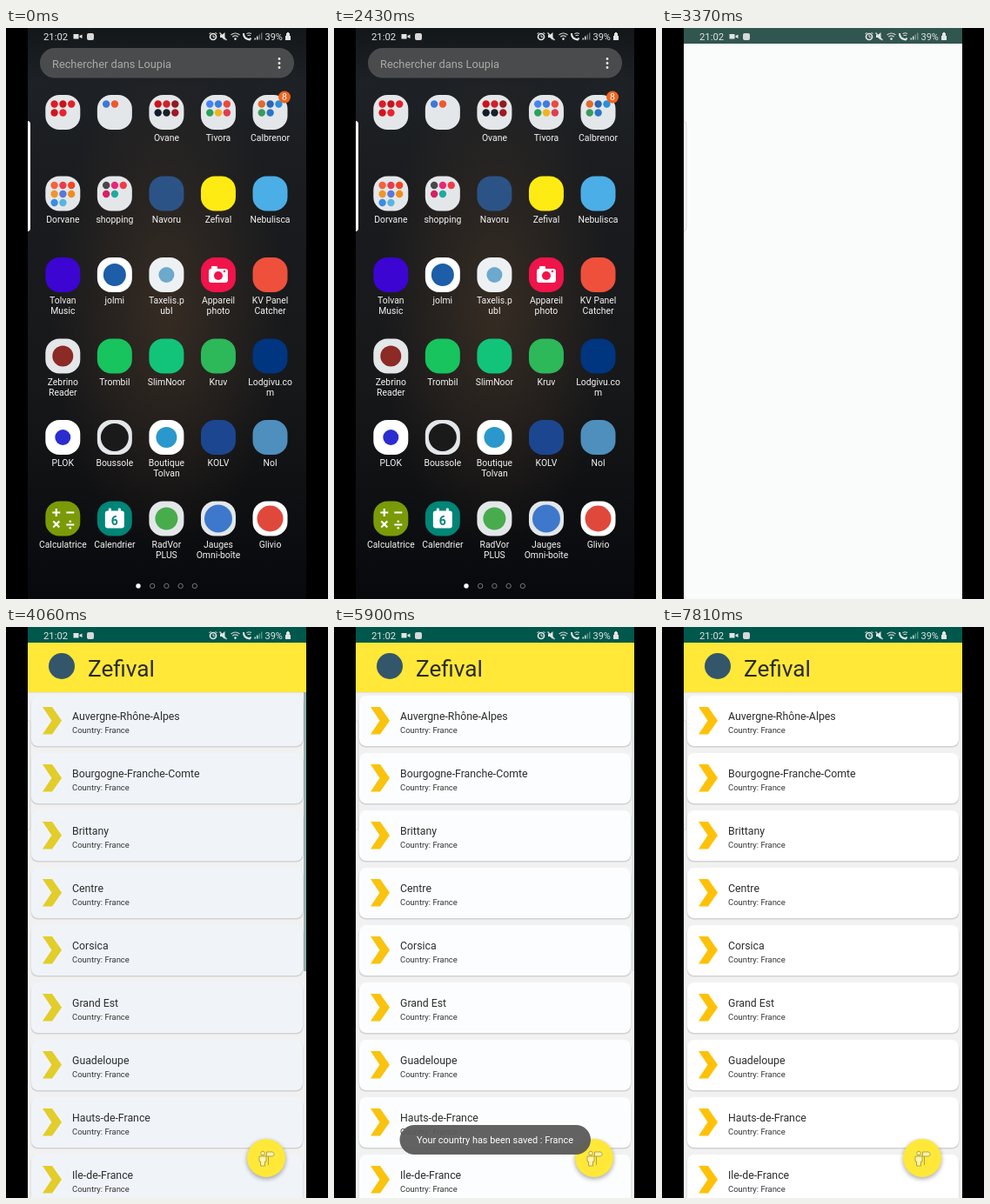
An HTML page for the animation above (8 s loop, 370 by 657 pixels).

```html
<!DOCTYPE html>
<html lang="fr">
<head>
<meta charset="utf-8">
<style>
  html, body { margin: 0; width: 100%; height: 100%; overflow: hidden; background: #000; }
  svg { display: block; width: 370px; height: 657px; font-family: Roboto, sans-serif; }
</style>
</head>
<body>
<svg id="stage" viewBox="0 0 370 657"></svg>
<script>
const stage = document.getElementById('stage');

const rect = (x, y, w, h, fill, r = 0, more = '') =>
  `<rect x="${x}" y="${y}" width="${w}" height="${h}" rx="${r}" fill="${fill}" ${more}/>`;
const circle = (x, y, r, fill, more = '') =>
  `<circle cx="${x}" cy="${y}" r="${r}" fill="${fill}" ${more}/>`;
const path = (d, fill, more = '') => `<path d="${d}" fill="${fill}" ${more}/>`;
const text = (x, y, size, fill, s, more = '') =>
  `<text x="${x}" y="${y}" font-size="${size}" fill="${fill}" ${more}>${s}</text>`;
const mid = 'text-anchor="middle"';
const line = (color, w) => `stroke="${color}" stroke-width="${w}"`;

// Small pictures, drawn around the icon centre
const camera = rect(-11, -7, 22, 16, '#fff', 3) + rect(-8, -10, 7, 4, '#fff', 1) +
  circle(0, 1, 5, '#f0144b') + circle(7, -4, 1.2, '#f0144b');
const calculator = path('M-12-7h9M-7.500-11.500v9M4-7h9M-11 3l7 7m0-7l-7 7M4 7h9', 'none', line('#fff', 2.2)) +
  circle(8.5, 3.3, 1.3, '#fff') + circle(8.5, 10.700, 1.3, '#fff');
const calendar = rect(-11, -9, 22, 20, '#fff', 3) + rect(-7, -12, 3, 6, '#fff', 1) + rect(4, -12, 3, 6, '#fff', 1) +
  text(0, 7, 14, '#008577', '6', mid + ' font-weight="700"');
const dot = (color, r = 13) => circle(0, 0, r, color);
const folder = colors => colors.split(' ').map((c, i) =>
  c === '-' ? '' : circle(-9.7 + i % 3 * 9.8, -9.5 + Math.floor(i / 3) * 10, 4.2, c)).join('');

const plate = '#e4e7e9';
// label, background, picture
const apps = [
  ['', plate, folder('#d81e28 #c4161c #e0202c #d2141e #e6242e')],
  ['', plate, folder('#3c78d8 #f0582c')],
  ['Ovane', plate, folder('#c8141e #d0202a #8c1c22 #101c2c #182028 #a01824')],
  ['Tivora', plate, folder('#4285f4 #3c7de0 #e84a3c #2aa25a #f0b41e #e03c50')],
  ['Calbrenor', plate, folder('#e06a2c #2c64b4 #2890dc #3c9a5a #2c74c8')],
  ['Dorvane', plate, folder('#f0643c #e83c50 #f04628 #f09628 #5a78d8 #f08c1e #3c8ce0 #5ab4e0')],
  ['shopping', plate, folder('#484848 #e6287c #f03c48 #d81e64 #1eaaa0')],
  ['Navoru', '#2c5385', ''],
  ['Zefival', '#ffeb14', ''],
  ['Nebulisca', '#4caee6', ''],
  ['Tolvan|Music', '#3c05d2', ''],
  ['jolmi', '#fff', dot('#1d5ea8')],
  ['Taxelis.p|ubl', '#eef1f3', dot('#6ca9cc', 9)],
  ['Appareil|photo', '#f0144b', camera],
  ['KV Panel|Catcher', '#ee503c', ''],
  ['Zebrino|Reader', plate, dot('#8c2a26', 12)],
  ['Trombil', '#18c45e', ''],
  ['SlimNoor', '#12c47a', ''],
  ['Kruv', '#2db85a', ''],
  ['Lodgivu.co|m', '#003580', ''],
  ['PLOK', '#fff', dot('#2a2cd0', 9)],
  ['Boussole', plate, dot('#1b1a1a', 16)],
  ['Boutique|Tolvan', '#fff', dot('#2a98cc', 12)],
  ['KOLV', '#1c4690', ''],
  ['Nol', '#4f8fbd', ''],
  ['Calculatrice', '#7a9a08', calculator],
  ['Calendrier', '#008577', calendar],
  ['RadVor|PLUS', plate, dot('#48ac4c')],
  ['Jauges|Omni-boîte', plate, dot('#3d78cc', 16)],
  ['Glivio', '#fff', dot('#e0483c', 15)],
];

const icon = ([label, color, picture], i) => {
  const x = 65.3 + i % 5 * 59.55, y = 97 + Math.floor(i / 5) * 93.5;
  return `<g transform="translate(${x} ${y})">` + rect(-20, -20, 40, 40, color, 16) + picture +
    label.split('|').map((s, n) => text(0, 33 + n * 12, 10.4, '#f4f4f4', s, mid)).join('') + '</g>';
};

const drawer =
  rect(25, 0, 320, 657, 'url(#night)') + rect(25, 0, 320, 657, 'url(#glow)') +
  rect(39, 23, 292, 34.5, '#4a4b4c', 17) +
  text(53, 45.5, 12.8, '#a9a9a9', 'Rechercher dans Loupia') +
  [35.5, 40.5, 45.5].map(y => circle(314, y, 1.4, '#e8e8e8')).join('') +
  apps.map(icon).join('') +
  circle(320, 79.500, 7, '#f0641e') + text(320, 83.300, 10.5, '#fff', '8', mid) +
  [0, 1, 2, 3, 4].map(i => circle(152 + i * 16.2, 642, 2.700, i ? 'none' : '#fff', i ? line('#777', 1) : '')).join('') +
  path('M25 107q3 0 3 4v119q0 4-3 4z', '#fff');

const regions = ['Auvergne-Rhône-Alpes', 'Bourgogne-Franche-Comte', 'Brittany', 'Centre', 'Corsica',
  'Grand Est', 'Guadeloupe', 'Hauts-de-France', 'Ile-de-France'];
const card = (name, i) => `<g transform="translate(0 ${i * 66})">` +
  rect(28.5, 80, 313, 58.500, '#d2d2d2', 8) + rect(29, 79, 312, 58, 'var(--card)', 8) +
  path('M42 92h11l11 15.700-11 15.800h-11l10.500-15.800z', 'var(--arrow)') +
  text(76, 107.300, 12.3, '#2c2c2c', name) + text(76, 122.300, 9.45, '#333', 'Country: France') + '</g>';

const fab = circle(299, 613, 22.500, '#000', 'opacity=".3" filter="url(#soft)"') + circle(299, 611, 22, '#ffe838') +
  `<g fill="#fff3a8" stroke="#a39a52" stroke-width=".9">` +
  `<circle cx="295" cy="605.500" r="2.300"/><path d="M291 609h8v6h-1.500v5h-5v-5H291z"/>` +
  `<path d="M299.500 604h7l2 2.500-2 2.500h-7zM301.500 609v10"/></g>`;

const list =
  rect(25, 18, 320, 639, '#f1f1f1') + rect(25, 18, 320, 57, '#ffe838') + rect(25, 75, 320, 1, '#e4e2d2') +
  circle(64, 45, 15, '#34566b') + text(94, 56.500, 26.2, '#2b2b26', 'Zefival') +
  regions.map(card).join('') +
  rect(342, 75, 3, 321, '#93aeac', 0, 'id="bar"') + fab;

const toast = rect(75.500, 573, 219.500, 34, '#5a5a5a', 17, 'opacity=".95"') +
  text(185, 593.700, 10.9, '#fff', 'Your country has been saved : France', mid);

const status = `<g fill="#e4e4e4">` +
  text(43, 14, 11.3, '#e4e4e4', '21:02') + text(297.500, 14, 11, '#e4e4e4', '39%') +
  `<path d="M77.500 7h6v5.500h-6zM84.500 9l3-1.500v4.500l-3-1.500z"/>` +
  rect(93, 6, 8, 8, '#d8d8d8', 2) +
  circle(238, 10, 3.5, 'none', line('#e4e4e4', 1.7)) +
  path('M238 8v2.300h2M233.500 7l2-2M242.500 7l-2-2', 'none', line('#e4e4e4', 1)) +
  `<path d="M246 8h2l3.500-3v9l-3.500-3h-2z"/>` +
  path('M245.500 5.500l8 8.500', 'none', line('#e4e4e4', 1.2)) +
  path('M258.500 8q5-4 10 0M260.300 10.200q3.200-2.500 6.400 0', 'none', line('#cfcfcf', 1.2)) + circle(263.500, 12.600, 1.3, '#e4e4e4') +
  path('M273 6q-.5 6 7 7.500l1.500-2', 'none', line('#e4e4e4', 2)) +
  path('M276.500 6.500q3-1.500 5.500 0M277.500 8.700q2-.8 3.500 0', 'none', line('#e4e4e4', 1)) +
  `<path d="M285.500 11.500h1.500v2h-1.500zM288 9.500h1.500v4H288z"/>` +
  `<path opacity=".4" d="M290.500 7.500h1.500v6h-1.500zM293 5.500h1.500v8H293z"/>` +
  `<path d="M322 6h1v-1h2v1h1v3h1v5h-6V9h1z"/></g>`;

stage.innerHTML = `<defs>
  <linearGradient id="night" x2="0" y2="1">
    <stop stop-color="#14171a"/><stop offset=".1" stop-color="#1e2125"/><stop offset=".3" stop-color="#191b1e"/>
    <stop offset=".62" stop-color="#17181a"/><stop offset="1" stop-color="#08090c"/></linearGradient>
  <radialGradient id="glow" cx=".5" cy=".49" r=".42">
    <stop stop-color="#4a3828" stop-opacity=".6"/><stop offset="1" stop-color="#4a3828" stop-opacity="0"/></radialGradient>
  <filter id="soft" x="-30%" y="-30%" width="160%" height="160%"><feGaussianBlur stdDeviation="2.500"/></filter>
  </defs>
  <g id="drawer">${drawer}</g>
  <g id="blank">${rect(25, 0, 320, 657, '#fafcfb', 0)}</g>
  <g id="list">${list}</g>
  <g id="top">${rect(25, 0, 320, 18, 'var(--top)')}
  ${path('M25 107q3 0 3 4v119q0 4-3 4', 'none', line('#d2d2d2', 0.8))}</g>
  <g id="toast">${toast}</g>${status}`;

const el = id => document.getElementById(id);
const ramp = (t, a, b) => Math.min(1, Math.max(0, (t - a) / (b - a)));
const mix = (a, b, p) => `rgb(${a.map((v, i) => Math.round(v + (b[i] - v) * p))})`;
const fade = (id, p) => el(id).setAttribute('opacity', p);

function draw(t) {
  const open = ramp(t, 3250, 3365), loaded = ramp(t, 3375, 3620), settle = ramp(t, 5415, 6020);
  const grow = 1 - (1 - open) ** 2;
  // The new window grows out of its icon
  el('blank').setAttribute('transform',
    `translate(${244 * (1 - grow)} ${190.5 * (1 - grow)}) scale(${grow})`);
  fade('blank', Math.min(1, open * 2));
  fade('top', open);
  fade('list', loaded);
  fade('bar', 1 - settle);
  fade('toast', ramp(t, 5415, 5900) * (1 - ramp(t, 7330, 7800)));
  stage.style.setProperty('--top', mix([48, 86, 79], [0, 87, 75], loaded));
  stage.style.setProperty('--card', mix([240, 244, 249], [255, 255, 255], settle));
  stage.style.setProperty('--arrow', mix([226, 205, 42], [255, 193, 7], settle));
}

const start = performance.now();
function tick(now) {
  draw(Math.max(0, now - start) % 8000);
  requestAnimationFrame(tick);
}
draw(0);
requestAnimationFrame(tick);
</script>
</body>
</html>
```
